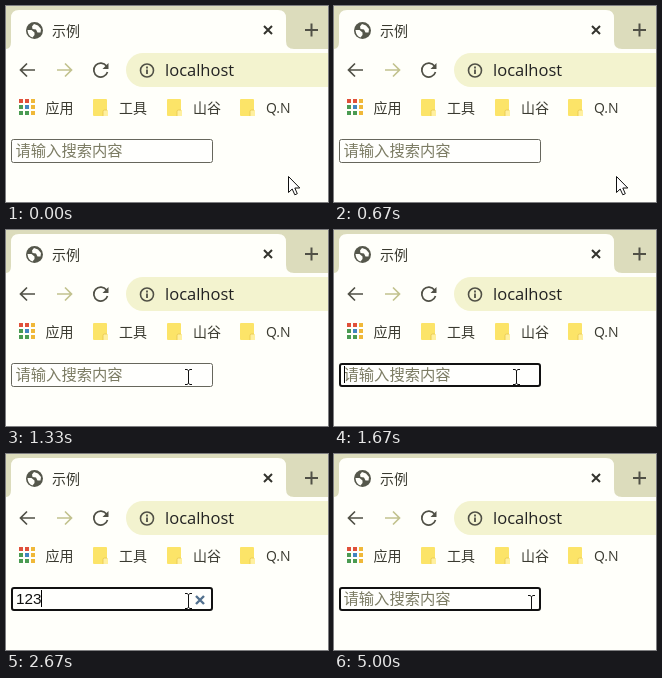
These frames come from a looping animation (322 px wide and 196 px high, 5.33 s). An HTML page:

```html
<!DOCTYPE html>
<html lang="zh">
<head>
<meta charset="utf-8">
<title>示例</title>
<style>
html, body { margin: 0; width: 100%; height: 100%; overflow: hidden; background: #fffffa; }
svg { display: block; width: 322px; height: 196px; }
text { font: 14px "Open Sans", "Noto Sans CJK SC", "Noto Sans CJK", sans-serif; fill: #3a3a30; }
.url { font-size: 16.5px; fill: #222; }
.field text { font: 15.3px "Liberation Sans", "Noto Sans CJK SC", "Noto Sans CJK", sans-serif; fill: #111; }
.field #hint { fill: #7c7c64; }
.line { fill: none; stroke: #505046; stroke-width: 1.7; }
</style>
</head>
<body>
<svg viewBox="0 0 322 196">
  <defs>
    <g id="folder">
      <path d="M1 0H13Q14 0 14 1V11H15V17H1Q0 17 0 16V1Q0 0 1 0Z" fill="#fce468"/>
      <path d="M10 17V12.5Q10 11 11.5 11H15V17Z" fill="#fff0a0"/>
      <path d="M10 17V12.5Q10 11 11.5 11H14" fill="none" stroke="#e6c64f" stroke-width=".8"/>
    </g>
  </defs>

  <rect width="322" height="43" fill="#dcdcbc"/>
  <path d="M0 43Q5 43 5 36V12Q5 4 13 4H272Q280 4 280 12V35Q280 43 288 43Z" fill="#fffffa"/>
  <circle cx="28.5" cy="24.500" r="8.500" fill="#55574b"/>
  <path d="M21.500 24H25.500L28.500 26.500V29L26.500 31.500Q22 30 21.500 24ZM28 18L32 19.500 35 23 34.500 26.500 31.500 26.500 30 23.500 26.500 23 26 20.500Z" fill="#fffffa"/>
  <text x="46" y="29.500">示例</text>
  <path class="line" d="M258 20L266 28M266 20L258 28" style="stroke:#33332d;stroke-width:2"/>
  <path class="line" d="M299 24H312M305.500 17.500V30.500" style="stroke-width:2"/>

  <path class="line" d="M29 64H15M21 57.500L14.500 64 21 70.500"/>
  <path class="line" d="M51 64H65M59 57.500L65.500 64 59 70.500" style="stroke:#c2c28e"/>
  <path class="line" d="M100.500 60A7 7 0 1 0 101.500 66"/>
  <path d="M102.500 57V63H96.500Z" fill="#505046"/>
  <path d="M322 47H137A17 17 0 0 0 137 81H322Z" fill="#f3f3cf"/>
  <circle class="line" cx="141" cy="64.500" r="6.500" style="stroke-width:1.600"/>
  <path class="line" d="M141 60.500V62.500M141 63.500V68" style="stroke-width:1.800"/>
  <text class="url" x="159" y="70">localhost</text>

  <g id="apps"></g>
  <text x="39.500" y="107">应用</text>
  <use href="#folder" x="87" y="93"/><text x="113" y="107">工具</text>
  <use href="#folder" x="161" y="93"/><text x="187" y="107">山谷</text>
  <use href="#folder" x="234" y="93"/><text x="260" y="107">Q.N</text>

  <g class="field">
    <rect id="box" fill="#fffffd"/>
    <text id="hint" x="9.500" y="150">请输入搜索内容</text>
    <text id="value" x="10" y="150"></text>
    <rect id="caret" y="136" width="1" height="17"/>
    <path id="clear" d="M190 142L198 150M198 142L190 150" stroke="#52708e" stroke-width="2.400"/>
  </g>
  <path id="arrow" d="M.5.5V16.500L4.200 13 6.800 18.800 9.300 17.700 6.800 12H11.800Z" fill="#fff" stroke="#111"/>
  <path id="beam" d="M-3 -7.500H-1L.5 -6.500 2 -7.500H4M.5 -6.500V6.500M-3 7.500H-1L.5 6.500 2 7.500H4" fill="none" stroke="#111"/>
</svg>
<script>
const $ = id => document.getElementById(id);
const set = (el, attrs) => { for (const k in attrs) el.setAttribute(k, attrs[k]); };
const show = (el, on) => el.style.display = on ? "" : "none";

const [red, green, blue, gold] = ["#e0503a", "#4a9b52", "#4285c0", "#f0b838"];
[red, red, gold, green, blue, gold, green, green, gold].forEach((fill, i) => {
  const dot = document.createElementNS("http://www.w3.org/2000/svg", "rect");
  set(dot, { x: 13 + i % 3 * 6, y: 93 + Math.floor(i / 3) * 6, width: 4, height: 4, fill });
  $("apps").append(dot);
});

// start ms, pointer, x, y, focused, value, caret visible
const steps = [
  [0, "arrow", 282, 170, false, "", false],
  [1000, "arrow", 247, 162, false, "", false],
  [1330, "beam", 182, 147, false, "", false],
  [1670, "beam", 182, 147, true, "", true],
  [2000, "beam", 182, 147, true, "1", true],
  [2330, "beam", 182, 147, true, "12", true],
  [2670, "beam", 182, 147, true, "123", true],
  [3000, "beam", 182, 147, true, "123", false],
  [3330, "beam", 182, 147, true, "123", true],
  [4000, "arrow", 195, 148, true, "123", false],
  [4670, "beam", 197, 149, true, "", true],
  [5000, "beam", 197, 149, true, "", false]
];

function draw(now) {
  const t = now % 5330;
  const [, pointer, x, y, focused, value, caret] = steps.findLast(s => s[0] <= t);
  for (const id of ["arrow", "beam"]) show($(id), id === pointer);
  set($(pointer), { transform: `translate(${x} ${y})` });
  set($("box"), focused
    ? { x: 6, y: 134, width: 200, height: 22, rx: 2, stroke: "#111", "stroke-width": 2 }
    : { x: 5.5, y: 133.5, width: 201, height: 23, rx: 2, stroke: "#66665c", "stroke-width": 1 });
  $("value").textContent = value;
  show($("hint"), !value);
  show($("clear"), value);
  show($("caret"), caret);
  set($("caret"), { x: Math.floor(10 + value.length * 8.5) });
  requestAnimationFrame(draw);
}
draw(performance.now());
</script>
</body>
</html>
```
